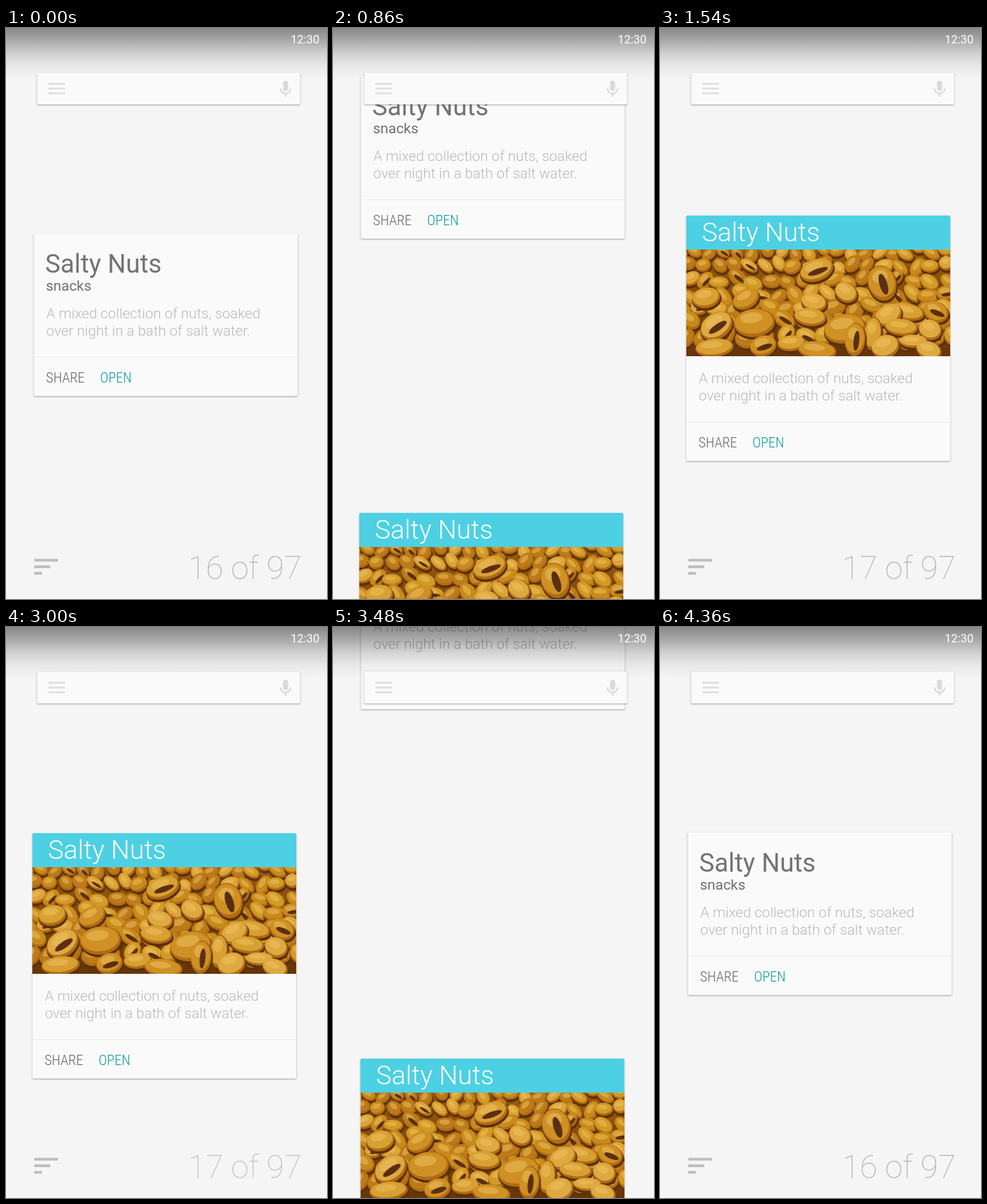
An HTML page with a canvas that plays this animation: 500 by 889 pixels, repeating every 4.9 s.

```html
<!DOCTYPE html>
<html lang="en">
<head>
<meta charset="utf-8">
<title>Card list</title>
<style>
  html, body { margin: 0; width: 100%; height: 100%; overflow: hidden; background: #f5f5f5; }
  canvas { display: block; width: 100%; height: 100%; }
</style>
</head>
<body>
<canvas id="stage" width="500" height="889"></canvas>
<script>
const W = 500, H = 889, LOOP = 4900, STEP = 40;
const UP_STEPS = 26, DOWN_STEPS = 35, FADE_STEPS = 5;
const ctx = document.getElementById('stage').getContext('2d');
const clamp = (v, lo, hi) => Math.min(hi, Math.max(lo, v));

const SANS = 'Roboto, sans-serif';
const NARROW = '"Roboto Condensed", Roboto, sans-serif';

function widthIn(family) {
  ctx.font = `300 22px ${family}`;
  return ctx.measureText('SHARE').width;
}
// Narrow the button face only where no condensed cut is installed.
const squeeze = widthIn(NARROW) < widthIn(SANS) - 2 ? 1 : 0.85;

function text(str, x, y, size, weight, color, align = 'left') {
  ctx.font = `${weight} ${size}px ${SANS}`;
  ctx.fillStyle = color;
  ctx.textAlign = align;
  ctx.fillText(str, x, y);
}

function button(str, x, y, color) {
  ctx.save();
  ctx.translate(x, y);
  ctx.scale(squeeze, 1);
  ctx.font = `300 22px ${NARROW}`;
  ctx.textAlign = 'left';
  ctx.fillStyle = color;
  ctx.fillText(str, 0, 0);
  ctx.restore();
}

function rect(x, y, w, h, color) {
  ctx.fillStyle = color;
  ctx.fillRect(x, y, w, h);
}

function panel(x, y, w, h) {
  ctx.save();
  ctx.shadowColor = 'rgba(0,0,0,.36)';
  ctx.shadowBlur = 2.5;
  ctx.shadowOffsetY = 1;
  ctx.fillStyle = '#fafafa';
  ctx.beginPath();
  ctx.roundRect(x, y, w, h, 1.5);
  ctx.fill();
  ctx.restore();
}

function makePhoto(w, h) {
  const pic = document.createElement('canvas');
  pic.width = w;
  pic.height = h;
  const p = pic.getContext('2d');
  let seed = 11;
  const rnd = () => (seed = (seed * 16807) % 2147483647) / 2147483647;

  const oval = (x, y, rx, ry, turn, color) => {
    p.fillStyle = color;
    p.beginPath();
    p.ellipse(x, y, rx, ry, turn, 0, Math.PI * 2);
    p.fill();
  };
  const nut = (x, y, rx, ry, turn, tone, split) => {
    oval(x + 1, y + 3, rx + 1, ry + 1, turn, '#5c300a');
    oval(x, y, rx, ry, turn, '#b06c14');
    oval(x - 1, y - 2, rx * 0.93, ry * 0.86, turn, tone);
    oval(x - rx * 0.15, y - ry * 0.35, rx * 0.55, ry * 0.38, turn, 'rgba(240,196,98,.5)');
    if (split) {
      const wide = rx > ry;
      oval(x + 2, y + 2, rx * (wide ? 0.6 : 0.28), ry * (wide ? 0.26 : 0.6), turn, '#5a2f12');
    }
  };

  const back = p.createLinearGradient(0, 0, 0, h);
  back.addColorStop(0, '#9a5c10');
  back.addColorStop(1, '#663508');
  p.fillStyle = back;
  p.fillRect(0, 0, w, h);

  const tones = ['#c98a1c', '#d39a26', '#bd7a18', '#dca438'];
  for (let row = 0; row < 7; row++) {
    const size = 11 + row * 0.9;
    for (let x = rnd() * 18 - 8; x < w + 10; x += size * (1.6 + rnd() * 0.7)) {
      nut(x, row * 22 + rnd() * 12 - 2, size * (0.95 + rnd() * 0.4), size * (0.7 + rnd() * 0.25),
        rnd() * 2 - 1, tones[Math.floor(rnd() * 4)], rnd() < 0.2);
    }
  }

  // x, y, half width, half height, turn
  const front = [
    [203, 32, 27, 17, -.35], [305, 52, 22, 28, -.3], [249, 67, 18, 15, .5],
    [31, 75, 22, 16, -.2], [93, 77, 22, 15, -.5], [199, 82, 20, 14, .2],
    [344, 97, 27, 13, .2], [389, 97, 20, 16, .4], [315, 102, 22, 16, -.5],
    [193, 105, 25, 14, .1], [106, 114, 32, 22, -.1], [47, 119, 27, 20, -.6],
    [335, 121, 26, 13, .1], [247, 123, 33, 23, -.2], [380, 125, 18, 16, .3],
    [291, 131, 13, 26, .1], [263, 140, 16, 26, .1], [354, 143, 22, 10, 0],
    [164, 146, 22, 12, -.1], [120, 150, 21, 16, -.3], [310, 151, 22, 18, -.3],
    [44, 153, 30, 14, -.1], [204, 157, 30, 14, .1], [378, 157, 20, 14, .3]
  ];
  const splits = new Set([0, 1, 7, 11, 16, 19]);
  front.forEach((n, i) => nut(...n, ['#d8a032', '#cf9024', '#dea941'][i % 3], splits.has(i)));
  return pic;
}
const photo = makePhoto(411, 166);

// Description, divider and buttons share one layout on both cards.
function cardBody(x, y, bodyY, lineY) {
  text('A mixed collection of nuts, soaked', x + 19.3, y + bodyY, 22.4, 300, '#b9b9b9');
  text('over night in a bath of salt water.', x + 19.3, y + bodyY + 27, 22.4, 300, '#b9b9b9');
  rect(x, y + lineY, 411, 1, '#e9e9e9');
  button('SHARE', x + 18.8, y + lineY + 39.5, '#666');
  button('OPEN', x + 103, y + lineY + 39.5, '#0b9aa2');
}

function textCard(x, y) {
  panel(x, y, 411, 253);
  text('Salty Nuts', x + 17.5, y + 60.5, 40, 400, '#737373');
  text('snacks', x + 18.8, y + 89, 22.4, 400, '#707070');
  cardBody(x, y, 132, 192);
}

function photoCard(x, y) {
  panel(x, y, 411, 382);
  ctx.fillStyle = '#4dd0e3';
  ctx.beginPath();
  ctx.roundRect(x, y, 411, 53.5, [1.5, 1.5, 0, 0]);
  ctx.fill();
  text('Salty Nuts', x + 24.3, y + 40, 41, 300, '#fff');
  ctx.drawImage(photo, x, y + 53);
  cardBody(x, y, 261, 321);
}

function footer(label, alpha) {
  [37, 25, 12].forEach((w, i) => rect(44, 826.5 + i * 10.2, w, 4.2, '#bdbdbd'));
  ctx.globalAlpha = alpha;
  text(label, 460.5, 858, 50, 100, '#b0b0b0', 'right');
  ctx.globalAlpha = 1;
}

function statusShade() {
  const g = ctx.createLinearGradient(0, 0, 0, 80);
  g.addColorStop(0, 'rgba(0,0,0,.45)');
  g.addColorStop(0.25, 'rgba(0,0,0,.31)');
  g.addColorStop(0.5, 'rgba(0,0,0,.15)');
  g.addColorStop(0.75, 'rgba(0,0,0,.05)');
  g.addColorStop(1, 'rgba(0,0,0,0)');
  rect(0, 0, W, 80, g);
  text('12:30', 488.3, 23.5, 18, 400, '#fff', 'right');
}

function searchBar() {
  panel(48.5, 70, 409.5, 49);
  for (let i = 0; i < 3; i++) rect(66, 85.5 + i * 7.4, 26, 2.8, '#dedede');
  ctx.fillStyle = ctx.strokeStyle = '#dadada';
  ctx.beginPath();
  ctx.roundRect(431.5, 82, 8, 16, 4);
  ctx.fill();
  ctx.lineWidth = 2.3;
  ctx.beginPath();
  ctx.arc(435.5, 94, 8, 0, Math.PI);
  ctx.stroke();
  rect(434.2, 102, 2.6, 5, '#dadada');
}

function stepsSince(t, start, count) {
  return clamp(Math.floor((t - start) / STEP) + 1, 0, count);
}

function draw(t) {
  const up = stepsSince(t, 540, UP_STEPS);
  const down = stepsSince(t, 3000, DOWN_STEPS);
  const lift = 708 * up / UP_STEPS;
  const textY = Math.round(320 - lift + 708 * down / DOWN_STEPS);
  const photoY = Math.round(1000 - lift + 1023 * down / DOWN_STEPS);

  const k = down || up;
  const fadeIn = down ? 17 : UP_STEPS - FADE_STEPS;
  const alpha = clamp(Math.max(1 - k / FADE_STEPS, (k - fadeIn) / FADE_STEPS), 0, 1);
  const index = up > 13 && down < 13 ? 17 : 16;

  rect(0, 0, W, H, '#f5f5f5');
  footer(`${index} of 97`, alpha);
  if (textY > -260) textCard(43.5, textY);
  if (photoY < H) photoCard(41 + down * 0.13, photoY);
  statusShade();
  searchBar();
}

const begin = performance.now();
function tick() {
  draw((performance.now() - begin) % LOOP);
  requestAnimationFrame(tick);
}
tick();
</script>
</body>
</html>
```
